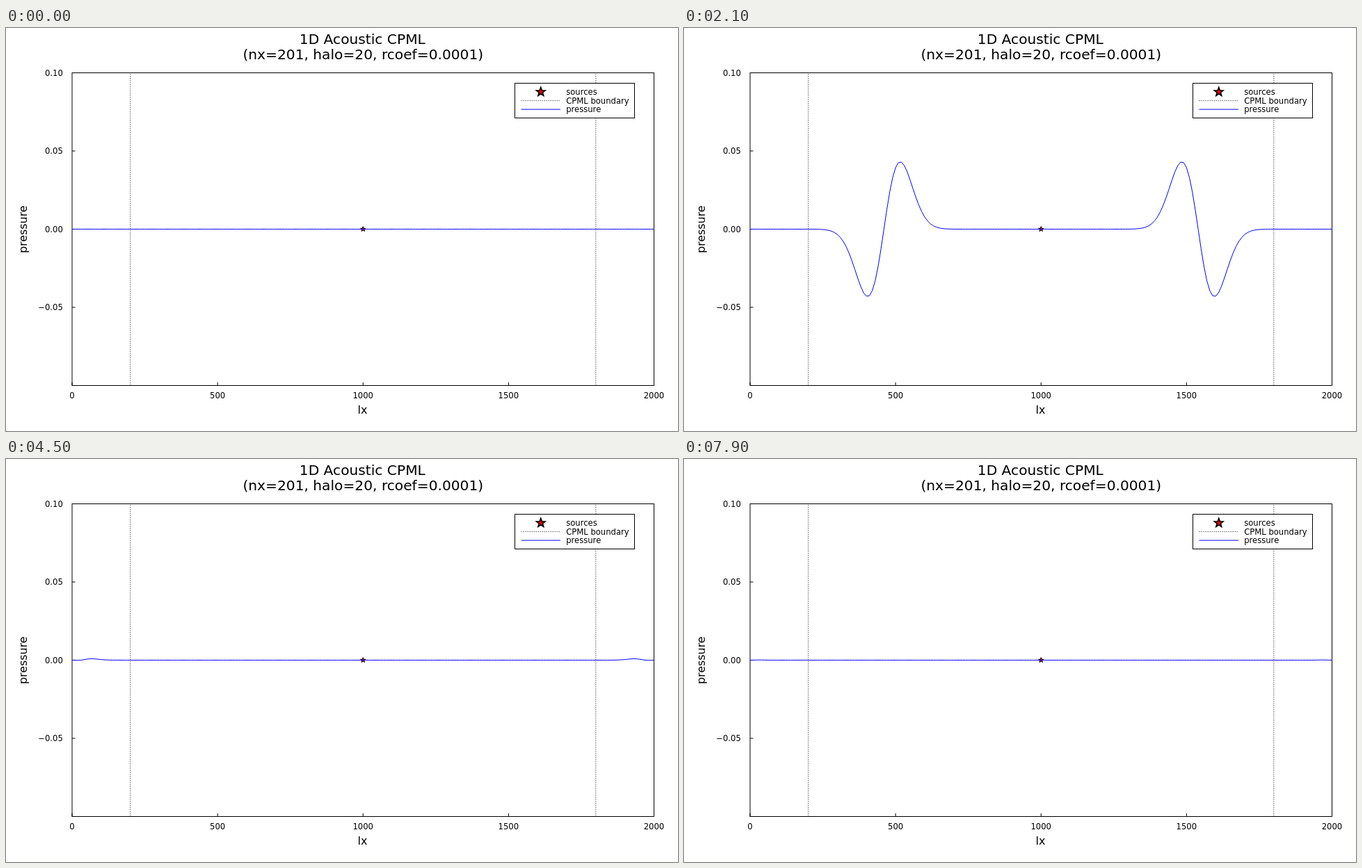
An HTML page for the animation above (8000 ms loop, 966x580 px).

```html
<!DOCTYPE html>
<html lang="en">
<head>
<meta charset="utf-8">
<title>1D Acoustic CPML</title>
<style>
  html, body { margin: 0; width: 100%; height: 100%; overflow: hidden; background: #fff; }
  svg { display: block; width: 966px; height: 580px; font-family: "DejaVu Sans", sans-serif; font-size: 11.6px; }
</style>
</head>
<body>
<svg id="plot" viewBox="0 0 966 580"></svg>
<script>
const svg = document.getElementById('plot');
const BOX = { x0: 95, x1: 931.5, y0: 64.5, y1: 514.5 };
const px = x => BOX.x0 + x / 2000 * (BOX.x1 - BOX.x0);
const py = p => (BOX.y0 + BOX.y1) / 2 - p / 0.2 * (BOX.y1 - BOX.y0);

function add(tag, attrs, text) {
  const el = document.createElementNS('http://www.w3.org/2000/svg', tag);
  for (const k in attrs) el.setAttribute(k, attrs[k]);
  if (text) el.textContent = text;
  svg.appendChild(el);
  return el;
}
const line = (x1, y1, x2, y2, extra) =>
  add('line', { x1, y1, x2, y2, stroke: '#000', ...extra });
const label = (x, y, text, anchor = 'middle', extra) =>
  add('text', { x, y, 'text-anchor': anchor, ...extra }, text);
const frameBox = (x, y, w, h, fill) =>
  add('rect', { x, y, width: w, height: h, fill, stroke: '#000' });

function star(cx, cy, r, width) {
  const pts = [];
  for (let i = 0; i < 10; i++) {
    const a = i * Math.PI / 5, q = i % 2 ? r * 0.42 : r;
    pts.push((cx + q * Math.sin(a)).toFixed(2) + ',' + (cy - q * Math.cos(a)).toFixed(2));
  }
  add('polygon', { points: pts.join(' '), fill: '#f00', stroke: '#000', 'stroke-width': width });
}

// Second-order wave equation with absorbing layers at both ends.
// With dt = dx / c the free wave travels without dispersion.
function simulate(frames) {
  const nx = 201, dx = 10, c = 2000, halo = 20, rcoef = 1e-4;
  const dt = dx / c, perFrame = 2, f0 = 8, t0 = 1.2 / f0, amp = 1000;
  const d0 = -3 * c * Math.log(rcoef) / (2 * halo * dx);
  const layer = pos => {
    const edge = Math.min(pos, nx - 1 - pos);
    const u = Math.min(1, Math.max(0, (halo + 1 - edge) / halo));
    if (!u) return { a: 0, b: 0 };
    const d = d0 * u * u, alpha = Math.PI * f0 * (1 - u);
    const b = Math.exp(-(d + alpha) * dt);
    return { a: d * (b - 1) / (d + alpha), b };
  };
  const full = Array.from({ length: nx }, (_, i) => layer(i));
  const half = Array.from({ length: nx - 1 }, (_, i) => layer(i + 0.5));
  const psi = new Float64Array(nx), xi = new Float64Array(nx);
  let old = new Float64Array(nx), cur = new Float64Array(nx), next = new Float64Array(nx);
  const out = [];
  for (let step = 0; out.length < frames; step++) {
    if (step % perFrame === 0) out.push(cur.slice());
    for (let i = 0; i < nx - 1; i++)
      psi[i] = half[i].b * psi[i] + half[i].a * (cur[i + 1] - cur[i]) / dx;
    for (let i = 1; i < nx - 1; i++) {
      const lap = (cur[i + 1] - 2 * cur[i] + cur[i - 1]) / (dx * dx);
      const dpsi = (psi[i] - psi[i - 1]) / dx;
      xi[i] = full[i].b * xi[i] + full[i].a * (lap + dpsi);
      next[i] = 2 * cur[i] - old[i] + c * c * dt * dt * (lap + dpsi + xi[i]);
    }
    const w = (Math.PI * f0 * (step * dt - t0)) ** 2;
    next[(nx - 1) / 2] += dt * dt * amp * (1 - 2 * w) * Math.exp(-w);
    [old, cur, next] = [cur, next, old];
  }
  return out;
}

const LOOP = 8000, STEP = 50, LAST = 158;
const curves = simulate(LAST + 1).map(p =>
  Array.from(p, (v, i) => px(i * 10).toFixed(2) + ',' + py(v).toFixed(3)).join(' '));

// Axes and labels
label(512.3, 22.6, '1D Acoustic CPML', 'middle', { 'font-size': 20.2 });
label(513.3, 44.6, '(nx=201, halo=20, rcoef=0.0001)', 'middle', { 'font-size': 20.2 });
label(512.5, 555, 'lx', 'middle', { 'font-size': 15.9 });
label(0, 0, 'pressure', 'middle', { 'font-size': 15.9, transform: 'translate(30.3 289.7) rotate(-90)' });
frameBox(BOX.x0, BOX.y0, BOX.x1 - BOX.x0, BOX.y1 - BOX.y0, '#fff');
for (let x = 0; x <= 2000; x += 500) {
  line(px(x), BOX.y1, px(x), BOX.y1 - 4.5);
  label(px(x), 532.7, String(x));
}
for (const v of [0.1, 0.05, 0, -0.05]) {
  line(BOX.x0, py(v), BOX.x0 + 4.5, py(v));
  label(81.8, py(v) + 4.3, v.toFixed(2).replace('-', '\u2212'), 'end');
}

// Series
const dotted = { stroke: '#555', 'stroke-dasharray': '1.5 1.5' };
star(px(1000), py(0), 3.8, 1);
for (const x of [200, 1800]) line(px(x), BOX.y1, px(x), BOX.y0, dotted);
const wave = add('polyline', { fill: 'none', stroke: '#00f', 'stroke-linejoin': 'round' });

// Legend
frameBox(731.5, 79.5, 172, 50, '#fff');
star(768.8, 92, 6.5, 1.7);
line(740.5, 104.6, 797, 104.6, dotted);
line(740.5, 117.1, 797, 117.1, { stroke: '#00f' });
['sources', 'CPML boundary', 'pressure'].forEach((t, i) => label(805.2, 96.3 + 12.5 * i, t, 'start'));

let shown = -1;
function draw(ms) {
  const n = Math.min(LAST, Math.floor(ms % LOOP / STEP));
  if (n !== shown) wave.setAttribute('points', curves[shown = n]);
}
const start = performance.now();
function tick() {
  draw(performance.now() - start);
  requestAnimationFrame(tick);
}
draw(0);
requestAnimationFrame(tick);
</script>
</body>
</html>
```
